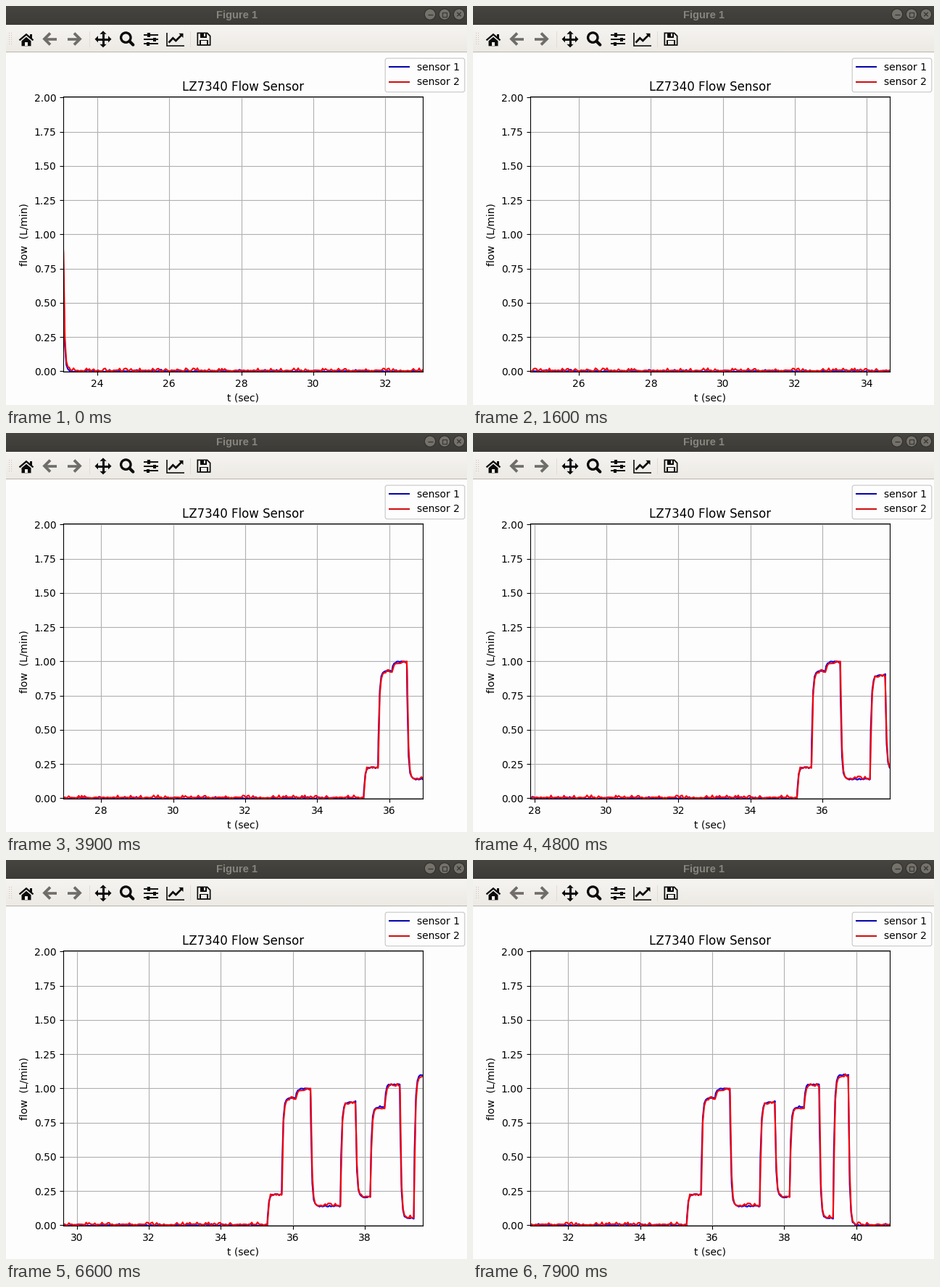
A matplotlib script that plays this animation: 636 by 551 pixels, repeating every 8000 ms.

```python
import numpy as np
import matplotlib.pyplot as plt
from matplotlib.animation import FuncAnimation
from matplotlib.patches import Circle, FancyBboxPatch, Polygon, Rectangle
from matplotlib.ticker import MultipleLocator

W, H, DPI = 636, 551, 100
FRAMES, STEP = 80, 100
PX = 72 / DPI
BG, INK, FADED = "#fefdfe", "#0b0b0b", "#6f6d69"

plt.rcParams["font.family"] = "DejaVu Sans"
fig = plt.figure(figsize=(W / DPI, H / DPI), dpi=DPI, facecolor=BG)
ui = fig.add_axes([0, 0, 1, 1])
ui.axis("off")


# Drawing helpers in pixels, y pointing down
def stroke(pts, color=INK, width=2.0, cap="butt", z=3):
    x, y = zip(*pts)
    ui.plot(x, y, color=color, lw=width * PX, solid_capstyle=cap,
            solid_joinstyle="miter", zorder=z)


def fill(pts, color=INK, z=3):
    ui.add_patch(Polygon(pts, fc=color, ec="none", zorder=z))


def box(x, y, w, h, color=INK, z=3):
    ui.add_patch(Rectangle((x, y), w, h, fc=color, ec="none", zorder=z))


def shade(y0, y1, top, bottom):
    ramp = np.linspace(top, bottom, 32)[:, None, :] / 255
    ui.imshow(ramp, extent=(0, W, y1, y0), aspect="auto", zorder=0,
              interpolation="bilinear")


def title_bar():
    shade(0, 26, (70, 69, 64), (60, 59, 55))
    ui.text(318.5, 16.5, "Figure 1", color="#88857d", ha="center", va="baseline",
            fontsize=10.5, weight="bold", family="Liberation Sans")
    dark, y, r = "#3a3935", 11.5, 2.7
    for x in (585, 605, 625):
        ui.add_patch(Circle((x, y), 7.6, fc="#74726b", ec="#32312d", lw=0.8, zorder=3))
    stroke([(581.5, y), (588.5, y)], dark, 1.4, z=4)
    ui.add_patch(Rectangle((602, y - 3), 6, 6, fc="none", ec=dark, lw=0.9, zorder=4))
    for s in (-r, r):
        stroke([(625 - r, y - s), (625 + r, y + s)], dark, 1.4, z=4)


def home(x, y):
    stroke([(x - 9.5, y + 1), (x, y - 7), (x + 9.5, y + 1)], width=2.3)
    box(x + 5, y - 7, 2.6, 6)
    fill([(x - 6.5, y + 2), (x, y - 3.5), (x + 6.5, y + 2), (x + 6.5, y + 9),
          (x - 6.5, y + 9)])
    box(x - 2, y + 4, 4, 5, "#f1efeb", 4)


def arrow(x, y, s):
    stroke([(x + 8 * s, y), (x - 9 * s, y)], FADED, 3.6)
    stroke([(x, y - 8), (x + 8 * s, y), (x, y + 8)], FADED, 3.8)


def pan(x, y):
    for dx, dy in ((1, 0), (-1, 0), (0, 1), (0, -1)):
        stroke([(x, y), (x + 8 * dx, y + 8 * dy)], width=3)
        fill([(x + a * dx + b * dy, y + a * dy + b * dx)
              for a, b in ((11.5, 0), (7, -4.6), (7, 4.6))])


def zoom(x, y):
    ui.add_patch(Circle((x, y), 6.7, fc="none", ec=INK, lw=3.3 * PX, zorder=3))
    stroke([(x + 5, y + 5), (x + 10, y + 10)], width=4.2, cap="round")


def sliders(x, y):
    for row, knob in enumerate((-3, 4.5, -4.5)):
        yy = y + 6.2 * (row - 1)
        stroke([(x - 10, yy), (x + 10, yy)], width=1.9)
        box(x + knob - 2, yy - 2.7, 4, 5.4)


def chart(x, y):
    stroke([(x, y - 17.6), (x, y), (x + 24, y)], width=1.6)
    stroke([(x + 2.5, y - 4), (x + 8.3, y - 10.3), (x + 12.3, y - 6.6),
            (x + 20, y - 14.3)], width=2.7)
    fill([(x + 22.5, y - 16.8), (x + 22.5, y - 10.6), (x + 16.3, y - 16.8)])


def disk(x, y):
    face = "#f1efeb"
    for m, color in ((0, INK), (1.7, face)):
        fill([(x + m, y + m), (x + 14.5 - m / 2, y + m), (x + 19 - m, y + 4.5 + m / 2),
              (x + 19 - m, y + 18.3 - m), (x + m, y + 18.3 - m)], color, 3 + m / 2)
    box(x + 4, y + 0.5, 9.5, 6.5, z=5)
    box(x + 9.2, y + 1.9, 2.3, 3.6, face, 6)
    box(x + 3.5, y + 10.3, 12, 7.2, z=5)
    box(x + 5.2, y + 11.9, 8.6, 4.7, face, 6)


def toolbar():
    shade(26, 63, (246, 244, 241), (237, 234, 229))
    box(0, 63, W, 1, "#b8b4ab")
    for y in range(37, 55, 3):
        for x in (4, 7):
            box(x, y, 1, 1, "#c6c2bb")
    for x in (115, 254):
        box(x, 35, 1, 22, "#e0dcd6")
    home(28, 46.3)
    arrow(61, 45.5, -1)
    arrow(94, 45.5, 1)
    pan(134, 45.8)
    zoom(165.3, 43.6)
    sliders(200, 46.2)
    chart(222, 54.6)
    disk(263.5, 36.5)


def legend():
    ui.add_patch(FancyBboxPatch((526, 75), 104, 41, boxstyle="round,pad=2.8",
                                fc=BG, ec="#cccccc", lw=0.9, zorder=3))
    for n, color in enumerate(("#0505ad", "#d01212")):
        y = 84.4 + 20.2 * n
        stroke([(528, y), (557, y)], color, 2.1, z=4)
        ui.text(567, y + 4.8, f"sensor {n + 1}", fontsize=10, va="baseline", zorder=4)


title_bar()
toolbar()
legend()
ui.set(xlim=(0, W), ylim=(H, 0))

# Valve turns: time in seconds and the new flow
TURNS = [(23.05, 0), (35.29, 0.223), (35.69, 0.93), (36.08, 0.997), (36.49, 0.14),
         (37.32, 0.897), (37.74, 0.207), (38.15, 0.863), (38.55, 1.029),
         (38.97, 0.052), (39.36, 1.099), (39.78, 0)]
rng = np.random.default_rng(12)
t = np.union1d(np.arange(22.9, 41.2, 0.04), [when for when, _ in TURNS])


def flow(lag):
    """Each turn is followed by a quick exponential settling."""
    y, level = np.full(t.size, 0.92), 0.92
    for when, new in TURNS:
        y += (new - level) * (1 - np.exp(-np.maximum(t - when - lag, 0) / 0.031))
        level = new
    return y


def noise(spread, bump, chance):
    return rng.uniform(-spread, spread, t.size) + bump * (rng.random(t.size) < chance)


blue = flow(0) + noise(0.005, 0.007, 0.1)
red = 0.985 * flow(0.008) + 0.005 + noise(0.004, 0.014, 0.22)

LEFT, RIGHT, TOP, BOTTOM = 79, 575, 125.1, 505.3
ax = fig.add_axes([LEFT / W, 1 - BOTTOM / H, (RIGHT - LEFT) / W, (BOTTOM - TOP) / H],
                  facecolor=BG)
ax.plot(t, blue, color="#0000f0", lw=1.5)
ax.plot(t, red, color="#ff0000", lw=1.5)
ax.grid(True, color="#b0b0b0", lw=0.8)
ax.set_title("LZ7340 Flow Sensor")
ax.set_xlabel("t (sec)")
ax.set_ylabel("flow  (L/min)")
ax.xaxis.set_major_locator(MultipleLocator(2))
ax.yaxis.set_major_locator(MultipleLocator(0.25))
ax.set_ylim(-0.0045, 2.007)


def update(i):
    # Nearly real-time scroll with a slight swing
    s = i * STEP / 1000
    x0 = 23.037 + 1.0024 * s + 0.035 * np.cos(2 * np.pi * (s - 4.9) / 4.2)
    ax.set_xlim(x0, x0 + 9.986)
    return ()


anim = FuncAnimation(fig, update, frames=FRAMES, interval=STEP, init_func=lambda: (),
                     repeat=True, repeat_delay=0, blit=False)
plt.show()
```
